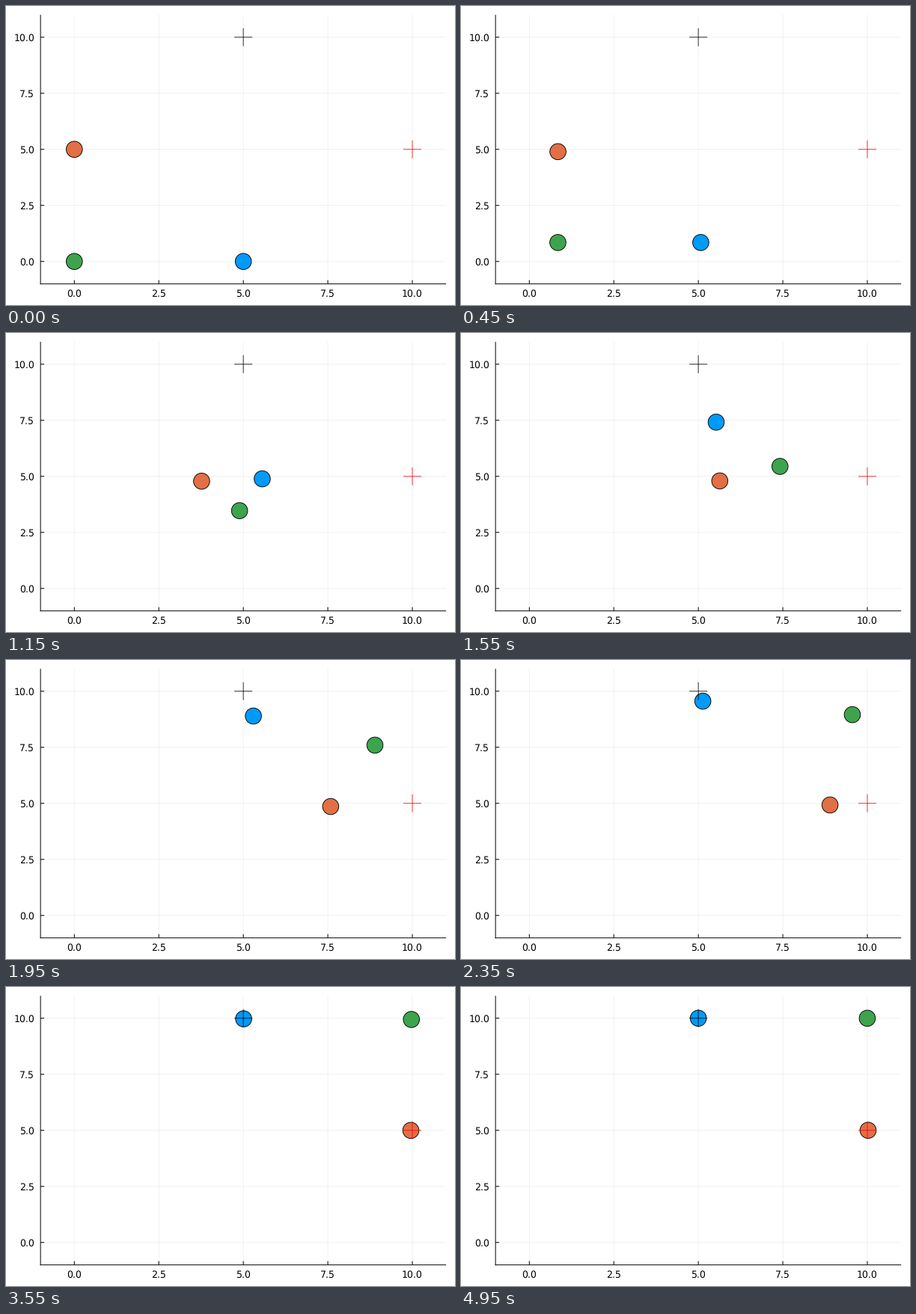
Write a matplotlib script that moves like this. It is 600 by 400 pixels and loops after 5 s.

```python
import numpy as np
import matplotlib.pyplot as plt
from matplotlib.animation import FuncAnimation
from matplotlib.patches import Circle

W, H, DPI = 600, 400, 100
FRAMES, STEP_MS = 100, 50
PX = 72 / DPI  # one pixel in points
plt.rcParams["text.hinting"] = "none"


def sx(x):
    return 91.3 + 45.17 * x


def sy(y):
    return 341.75 - 30 * y


def progress(s):
    """Skewed S-curve from 0 to 1: soft start, exponential settling."""
    g = s * np.exp(0.1 * s - 5.48)
    return g / (1 + g)


def lag(s, amount, peak, width):
    """Delay while giving way, a bell on a logarithmic time axis."""
    return amount * np.exp(-(np.log(max(s, 1) / peak) / width) ** 2)


def positions(s):
    """Blue, orange and green centres at step s, each bending to avoid the others."""
    p = progress(s)
    q = 1.0025 * p - lag(s, 0.18, 30.8, 0.43)
    blue = 5 + 3.2 * p ** 1.5 * (1 - p), 10 * p
    orange = 10 * q, 5 - 0.72 * max(q, 0) ** 0.75 * (1 - q)
    green = 10 * p, 10 * p - lag(s, 2.0, 29.5, 0.425)
    return blue, orange, green


fig = plt.figure(figsize=(W / DPI, H / DPI), dpi=DPI, facecolor="white")
ax = fig.add_axes([0, 0, 1, 1])
ax.set(xlim=(0, W), ylim=(H, 0))
ax.axis("off")


def line(xs, ys, color="black", **kw):
    ax.plot(xs, ys, color=color, lw=PX, snap=False, solid_capstyle="butt", **kw)


def label(x, y, value, ha):
    ax.text(x, y, f"{value:.1f}", ha=ha, va="center_baseline",
            family="DejaVu Sans", size=12.5 * PX)


left, right = sx(-1), sx(11)
bottom, top = sy(-1), sy(11)
for v in np.arange(0, 10.1, 2.5):
    x, y = sx(v), sy(v)
    line([x, x], [bottom, top], alpha=0.055, zorder=1)
    line([left, right], [y, y], alpha=0.055, zorder=1)
    line([x, x], [bottom, bottom - 5], zorder=2)
    line([left, left + 5], [y, y], zorder=2)
    label(x, 383.5, v, "center")
    label(38.2, y + 0.3, v, "right")
line([left, left], [bottom + 0.5, top], zorder=2)
line([left - 0.5, right], [bottom, bottom], zorder=2)

dots = [Circle((0, 0), 10.8, fc=c, ec="black", lw=0.9 * PX, zorder=4)
        for c in ("#009AFA", "#E26F46", "#3DA44D")]
for dot in dots:
    ax.add_patch(dot)

for x, y, color in [(5, 10, "black"), (10, 5, "red")]:
    x, y = sx(x), sy(y)
    line([x - 12, x + 12], [y, y], color, alpha=0.8, zorder=5)
    line([x, x], [y - 12, y + 12], color, alpha=0.8, zorder=5)


def update(i):
    for dot, (x, y) in zip(dots, positions(i)):
        dot.center = sx(x), sy(y)
    return dots


anim = FuncAnimation(fig, update, frames=FRAMES, interval=STEP_MS,
                     repeat=True, repeat_delay=0, blit=False)
plt.show()
```
